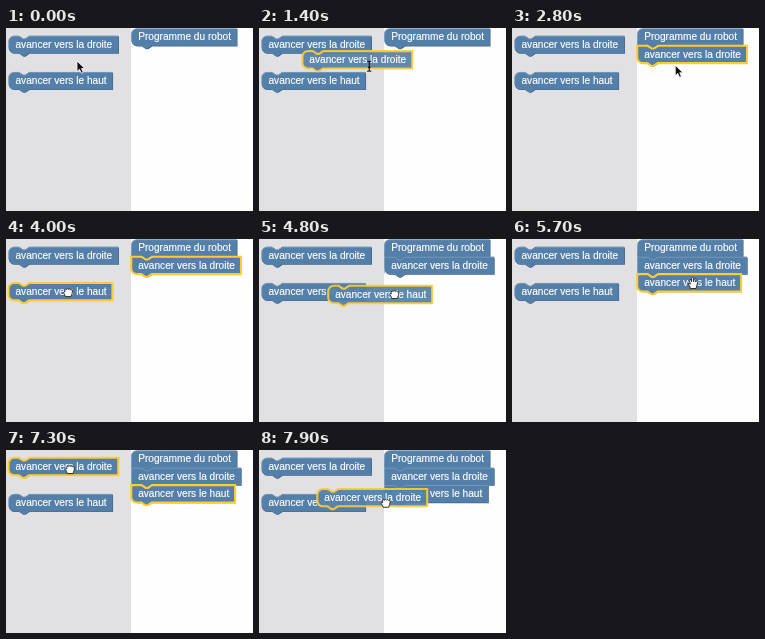
Write an HTML page that moves like this. It is 247x183 px and loops after 8000 ms.

```html
<!DOCTYPE html>
<html lang="fr">
<head>
<meta charset="utf-8">
<title>Programme du robot</title>
<style>
  html, body { margin: 0; width: 100%; height: 100%; overflow: hidden; background: #fefefe; }
  svg { display: block; width: 247px; height: 183px; }
  text { font: 14.6px "Liberation Sans", Arial, sans-serif; fill: #fff; stroke: #fff; stroke-width: .25; }
  .body { fill: #547fa8; }
  .dark { fill: #43668a; }
  .light { fill: none; stroke: #84a4c2; }
  .selected .body { stroke: #fc3; stroke-width: 3; }
  .selected .light, .dragging .light, .dragging .dark { display: none; }
  .dragging .body { fill-opacity: .92; stroke-opacity: .9; }
  .white { fill: #fff; stroke: #222; stroke-width: .9; stroke-linejoin: round; }
</style>
</head>
<body>
<svg viewBox="0 0 247 183">
  <rect width="125" height="183" fill="#e1e1e3"/>
  <g id="blocks"></g>
  <circle id="ripple" fill="none" stroke="#888"/>
  <g id="cursor">
    <path id="arrow" d="M0 0V10.6L2.5 8.3L4.3 12.2L6.2 11.3L4.5 7.6H7.8Z" fill="#111" stroke="#fff" stroke-width=".8"/>
    <path id="open" class="white" d="M-2.6 5.5Q-3 3-5 .5Q-4-.5-2.6 1.2L-3.7-2.8Q-3-4.5-2-3L-1.4-1.3L-1.5-4.6Q-.5-6.5.4-4.6L.6-1.4L1.4-4.2Q2.5-5.5 3-3.7L2.5-.9L3.6-2.4Q5-3 5-1.5Q4 2 3 5.5Z"/>
    <path id="closed" class="white" d="M-2.6 4.6Q-3 3-4.6.4Q-4-.8-3-.1L-3.3-1.8Q-2.5-3.8-1.3-2.6Q-.3-4 .8-2.7Q2-3.6 2.8-2.2Q4.6-2.6 4.5-1.1Q4.3 2 2.9 4.6Z"/>
    <path id="ibeam" d="M-2-5Q0-5 0-3.6Q0-5 2-5M0-3.6V4M-2 5.4Q0 5.4 0 4Q0 5.4 2 5.4M-1.2 1.4H1.2" fill="none" stroke="#111" stroke-width="1.1"/>
  </g>
</svg>
<script>
const LOOP = 8000, STEP = 100, LEAD = 40;
const SCALE = 0.695, ROW = 25 * SCALE;
const $ = id => document.getElementById(id);

function add(parent, tag, attrs = {}) {
  const node = document.createElementNS("http://www.w3.org/2000/svg", tag);
  for (const key in attrs) node.setAttribute(key, attrs[key]);
  return parent.appendChild(node);
}

const show = (node, on) => node.style.display = on ? "" : "none";
const topEdge = (notch, width) => (notch ? "H15l6 4h3l6 -4" : "") + `H${width}`;

function outline(width, notch, squareTop, squareBottom) {
  const start = squareTop ? "M0 0" : "M0 8a8 8 0 0 1 8 -8";
  const end = squareBottom ? "H0" : "H8a8 8 0 0 1 -8 -8";
  return start + topEdge(notch, width) + "v25H29.5l-6 4h-3l-6 -4" + end + "Z";
}

function makeBlock(label, width, notch = true) {
  const group = add($("blocks"), "g");
  const dark = add(group, "path", { class: "dark", transform: "translate(1 1)" });
  const body = add(group, "path", { class: "body" });
  const light = add(group, "path", { class: "light" });
  add(group, "text", { x: 10, y: 17.4 }).textContent = label;
  return ([x, y], { state = "", squareTop, squareBottom, visible = true } = {}) => {
    show(group, visible);
    group.setAttribute("transform", `translate(${x} ${y}) scale(${SCALE})`);
    group.setAttribute("class", state);
    const d = outline(width, notch, squareTop, squareBottom);
    body.setAttribute("d", d);
    dark.setAttribute("d", d);
    const corner = squareTop ? "M.5 24V.5" : "M.5 17V8A7.5 7.5 0 0 1 8 .5";
    light.setAttribute("d", corner + topEdge(notch, width - 0.5));
  };
}

const RIGHT = { label: "avancer vers la droite", width: 158, home: [2.5, 7.8] };
const UP = { label: "avancer vers le haut", width: 149.5, home: [2.5, 44] };
const slot = row => [125.2, 0.4 + row * ROW];

const tools = [RIGHT, UP].map(kind => ({ ...kind, draw: makeBlock(kind.label, kind.width) }));
const drawProgram = makeBlock("Programme du robot", 152, false);

// Each drag takes a copy of a tool block, pressed at grip, to a point near its slot.
const drags = [
  { kind: RIGHT, grip: [62.5, 21], press: 500, start: 1100, end: 2100, drop: 2400, to: [121.3, 21.5], bulge: 12, power: 1.35 },
  { kind: UP, grip: [62, 53], press: 4000, start: 4100, end: 5300, drop: 5500, to: [121.5, 35], bulge: 8, power: 2.5 },
  { kind: RIGHT, grip: [64, 19], press: 7300, start: 7500, end: 8500, drop: LOOP, to: [121.3, 52], bulge: 10.4, power: 1.42 }
].map((drag, i) => ({
  ...drag, row: i + 1, from: drag.kind.home, draw: makeBlock(drag.kind.label, drag.kind.width)
}));

const plus = (a, b) => [a[0] + b[0], a[1] + b[1]];
const minus = (a, b) => [a[0] - b[0], a[1] - b[1]];
const between = (t, from, to) => t >= from && t < to;

// Eased move that sags by bulge halfway.
function glide({ from, to, start, end, bulge = 0, power = 1.5 }, t) {
  const u = Math.min(1, Math.max(0, (t - start) / (end - start)));
  const s = Math.sin(u * Math.PI / 2) ** power;
  const [dx, dy] = minus(to, from);
  return plus(from, [dx * s, dy * s + bulge * Math.sin(Math.PI * s)]);
}

const gripOffset = drag => minus(drag.grip, drag.kind.home);
const release = drag => plus(drag.to, gripOffset(drag));
const EDGE = [105, 55];
const reaches = [
  { start: 0, end: 300, from: [71, 33], to: drags[0].grip },
  { start: 2700, end: 3100, from: release(drags[0]), to: EDGE, bulge: -3.5 },
  { start: 3200, end: 4000, from: EDGE, to: drags[1].grip },
  { start: 6000, end: 7100, from: release(drags[1]), to: drags[2].grip }
];
const legs = [...reaches, ...drags].sort((a, b) => a.start - b.start);

function pointerAt(t) {
  const leg = legs.filter(l => l.start <= t).pop();
  if (!leg.kind) return glide(leg, t);
  return plus(glide(leg, t > leg.start ? t + LEAD : t), gripOffset(leg));
}

const inside = ([x, y], [left, top], width, height) =>
  between(x, left, left + width * SCALE) && between(y, top, top + height);

function drawDrag(drag, t) {
  const dragging = t < drag.drop;
  const selected = !drags.some(d => d.row > drag.row && t > d.start);
  drag.draw(dragging ? glide(drag, t) : slot(drag.row), {
    visible: t > drag.start,
    state: (selected ? "selected" : "") + (dragging ? " dragging" : ""),
    squareTop: !dragging,
    squareBottom: drags.some(d => d.row > drag.row && t >= d.drop)
  });
}

function drawRipple(t) {
  const drag = drags.find(d => between(t, d.drop, d.drop + STEP));
  const ripple = $("ripple"), progress = 0.4;
  show(ripple, drag);
  if (!drag) return;
  const [x, y] = slot(drag.row);
  ripple.setAttribute("cx", x + 23 * SCALE);
  ripple.setAttribute("cy", y - 3 * SCALE);
  ripple.setAttribute("r", progress * 25 * SCALE);
  ripple.setAttribute("stroke-width", 10 * (1 - progress) * SCALE);
}

function render(time) {
  const t = Math.floor(time % LOOP / STEP) * STEP;
  const pointer = pointerAt(t);
  const pressed = drags.some(d => between(t, d.press, d.drop));
  const carrying = drags.some(d => t > d.start && t < d.drop);
  const rows = 1 + drags.filter(d => t >= d.drop).length;

  let over = inside(pointer, slot(0), 158, rows * ROW);
  for (const { home, width, draw } of tools) {
    const hover = !carrying && inside(pointer, home, width, ROW);
    draw(home, { state: hover ? "selected" : "" });
    over = over || hover;
  }
  drawProgram(slot(0), { squareBottom: rows > 1 });
  for (const drag of drags) drawDrag(drag, t);
  drawRipple(t);

  const cursor = between(t, 1300, 1600) ? "ibeam" : pressed ? "closed" : over ? "open" : "arrow";
  for (const id of ["arrow", "open", "closed", "ibeam"]) show($(id), id === cursor);
  $("cursor").setAttribute("transform", `translate(${pointer})`);
}

const began = performance.now();
function tick() {
  render(performance.now() - began);
  requestAnimationFrame(tick);
}
tick();
</script>
</body>
</html>
```
